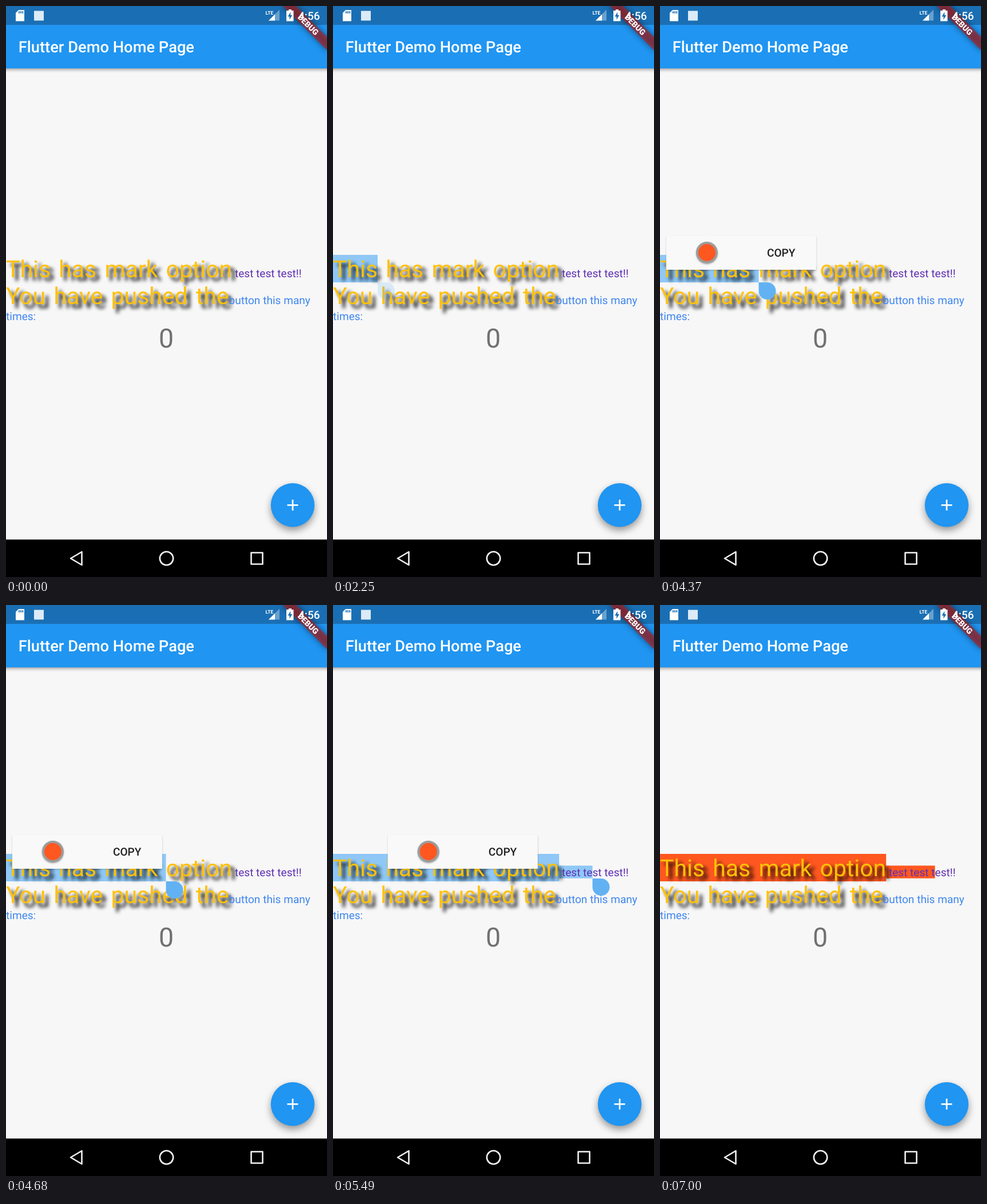
Animation of 561x998 px, one loop 8000 ms. Source, as an HTML page with a canvas:

```html
<!DOCTYPE html>
<html lang="en">
<head>
<meta charset="utf-8">
<title>Text selection demo</title>
<style>
  html, body { margin: 0; width: 100%; height: 100%; overflow: hidden; background: #f7f7f7; }
  canvas { display: block; }
</style>
</head>
<body>
<canvas id="stage" width="561" height="998"></canvas>
<script>
const ctx = document.getElementById('stage').getContext('2d');
const W = 561, H = 998, LOOP = 8000;
const DP = W / 411;
const BLUE = '#2095f1', ORANGE = '#ff5720', PALE = '#8fc8f6', GRIP = '#62b2f3';
const BIG = 30 * DP, SMALL = 14 * DP, WORD_GAP = 3 * DP;
const MARKED = 'This has mark option', TAIL = ' test test test!!';

// [time, number of selected characters]
const DRAG = [
  [2250, 4], [4370, 9], [4410, 10], [4500, 12], [4590, 13], [4680, 14],
  [4910, 15], [4960, 16], [5010, 17], [5070, 18], [5190, 20], [5290, 23],
  [5390, 26], [5490, 28], [5630, 29], [5830, 30], [5870, 31], [6710, 32]
];
const SELECT = 2250, MENU = 2700, APPLY = 7000;

function setFont(size, weight = 400, gap = 0) {
  ctx.font = `${weight} ${size}px Roboto, sans-serif`;
  ctx.wordSpacing = gap + 'px';
  ctx.textRendering = 'geometricPrecision';
}

function measure(str, size, gap = 0) {
  setFont(size, 400, gap);
  return ctx.measureText(str).width;
}

function text(str, x, y, size, color, { weight = 400, gap = 0, align = 'left' } = {}) {
  setFont(size, weight, gap);
  ctx.textAlign = align;
  ctx.fillStyle = color;
  ctx.fillText(str, x, y);
}

function rect(x, y, w, h, color) {
  ctx.fillStyle = color;
  ctx.fillRect(x, y, w, h);
}

function circle(x, y, r, color) {
  ctx.beginPath();
  ctx.arc(x, y, r, 0, Math.PI * 2);
  ctx.fillStyle = color;
  ctx.fill();
}

function polygon(color, ...points) {
  ctx.beginPath();
  points.forEach(([x, y]) => ctx.lineTo(x, y));
  ctx.closePath();
  ctx.fillStyle = color;
  ctx.fill();
}

function withShadow(alpha, blur, dx, dy, draw) {
  ctx.save();
  ctx.shadowColor = `rgba(0,0,0,${alpha})`;
  ctx.shadowBlur = blur;
  ctx.shadowOffsetX = dx;
  ctx.shadowOffsetY = dy;
  draw();
  ctx.restore();
}

const markedWidth = measure(MARKED, BIG, WORD_GAP);

function edgeOf(count) {
  const n = MARKED.length;
  return count <= n
    ? measure(MARKED.slice(0, count), BIG, WORD_GAP)
    : markedWidth + measure(TAIL.slice(0, count - n), SMALL);
}

function selectedCount(t) {
  return DRAG.reduce((count, [time, n]) => t >= time ? n : count, 0);
}

function fadeStep(t, start, steps, length) {
  return Math.min(1, (Math.floor((t - start) / length) + 1) / steps);
}

function drawSelection(edge, color) {
  rect(0, 435, Math.min(edge, markedWidth), 48, color);
  if (edge > markedWidth) rect(markedWidth, 455.5, edge - markedWidth, 22.2, color);
}

function drawParagraph() {
  const bigLine = (str, y) => withShadow(1, 6.2, 5 * DP, 5 * DP, () =>
    text(str, 0, y, BIG, '#ffc107', { gap: WORD_GAP }));
  bigLine(MARKED, 473.5);
  text(TAIL, markedWidth, 473.5, SMALL, '#5f30b3');
  const second = 'You have pushed the';
  bigLine(second, 521);
  text('button this many', measure(second, BIG, WORD_GAP), 521, SMALL, '#3f86f0');
  text('times:', 0, 548.5, SMALL, '#3f86f0');
  text('0', 280, 597, 34 * DP, '#717171', { align: 'center' });
}

function drawHandle(edge, alpha) {
  const r = 11 * DP, y = edge > markedWidth ? 478 : 483;
  ctx.save();
  ctx.globalAlpha = alpha;
  ctx.beginPath();
  ctx.moveTo(edge, y);
  ctx.lineTo(edge + r, y);
  ctx.arc(edge + r, y + r, r, -Math.PI / 2, Math.PI);
  ctx.closePath();
  ctx.fillStyle = GRIP;
  ctx.fill();
  ctx.restore();
}

function drawMenu(edge, alpha) {
  const width = 262, x = Math.max(8 * DP, edge / 2 - width / 2);
  ctx.save();
  ctx.globalAlpha = alpha;
  withShadow(0.3, 3, 0, 1, () => rect(x, 401.5, width, 59.5, '#f9f9f9'));
  withShadow(0.3, 3, 0, 1.5, () => circle(x + 71, 431, 19, '#9c9c9c'));
  circle(x + 71, 431, 15, ORANGE);
  text('COPY', x + 176, 438, SMALL, '#1f1f1f', { weight: 500 });
  ctx.restore();
}

function drawBanner() {
  ctx.save();
  ctx.translate(W, 0);
  ctx.rotate(Math.PI / 4);
  ctx.scale(DP, DP);
  ctx.filter = 'blur(5.4px)';
  rect(-40, 28, 80, 12, 'rgba(0,0,0,0.5)');
  ctx.filter = 'none';
  rect(-40, 28, 80, 12, 'rgba(183,28,28,0.627)');
  text('DEBUG', 0, 37.6, 10.2, '#fff', { weight: 900, align: 'center' });
  ctx.restore();
}

function drawStatusIcons() {
  const white = '#fff', back = '#1a6fb4';
  polygon(white, [22, 7], [32, 7], [32, 26.5], [17, 26.5], [17, 12]);
  [22, 25.2, 28.4].forEach(x => rect(x, 9, 1.8, 4, back));
  rect(49, 8.5, 17, 17, '#dcebf6');
  text('LTE', 453.5, 15, 8.5, white, { weight: 700 });
  polygon('rgba(255,255,255,0.35)', [459, 25.5], [478, 25.5], [478, 6.5]);
  polygon(white, [459, 25.5], [470, 25.5], [470, 14.5]);
  rect(494, 6, 5, 3, white);
  rect(490, 8, 12.5, 18.5, white);
  polygon(back, [497.3, 10.5], [492.5, 18.5], [495.5, 18.5],
    [495.5, 24], [500.3, 16], [497.3, 16]);
  text('4:56', 511, 24, SMALL, white, { weight: 500 });
}

function drawNavBar() {
  rect(0, 932.5, W, H - 932.5, '#000');
  ctx.strokeStyle = '#f2f2f2';
  ctx.lineWidth = 2.6;
  ctx.lineJoin = 'round';
  ctx.beginPath();
  ctx.moveTo(113, 965.5);
  ctx.lineTo(132.5, 954);
  ctx.lineTo(132.5, 977);
  ctx.closePath();
  ctx.stroke();
  ctx.beginPath();
  ctx.arc(280.5, 965.5, 11.7, 0, Math.PI * 2);
  ctx.stroke();
  ctx.strokeRect(428.5, 955.5, 20, 20);
}

function drawAppBar() {
  withShadow(0.4, 6, 0, 1.5, () => rect(-10, 0, W + 20, 109, BLUE));
  rect(0, 0, W, 33, '#1a6fb4');
  text('Flutter Demo Home Page', 16 * DP, 81, 20 * DP, '#fff', { weight: 500 });
}

function drawButton() {
  withShadow(0.4, 13, 0, 6, () => circle(501, 872.3, 28 * DP, BLUE));
  rect(491.5, 871, 19, 2.7, '#fff');
  rect(499.7, 862.8, 2.7, 19, '#fff');
}

function draw(t) {
  const edge = edgeOf(selectedCount(t));
  const selecting = t >= SELECT && t < APPLY;
  rect(0, 0, W, H, '#f7f7f7');
  if (t >= SELECT) drawSelection(edge, selecting ? PALE : ORANGE);
  drawParagraph();
  drawAppBar();
  drawButton();
  if (selecting) {
    const alpha = t < MENU ? fadeStep(t, SELECT, 5, 42) : fadeStep(t, MENU, 3, 45);
    drawHandle(edge, alpha);
    if (t >= MENU) drawMenu(edge, alpha);
  }
  drawBanner();
  drawStatusIcons();
  drawNavBar();
}

const began = performance.now();
function tick() {
  draw((performance.now() - began) % LOOP);
  requestAnimationFrame(tick);
}
tick();
</script>
</body>
</html>
```
